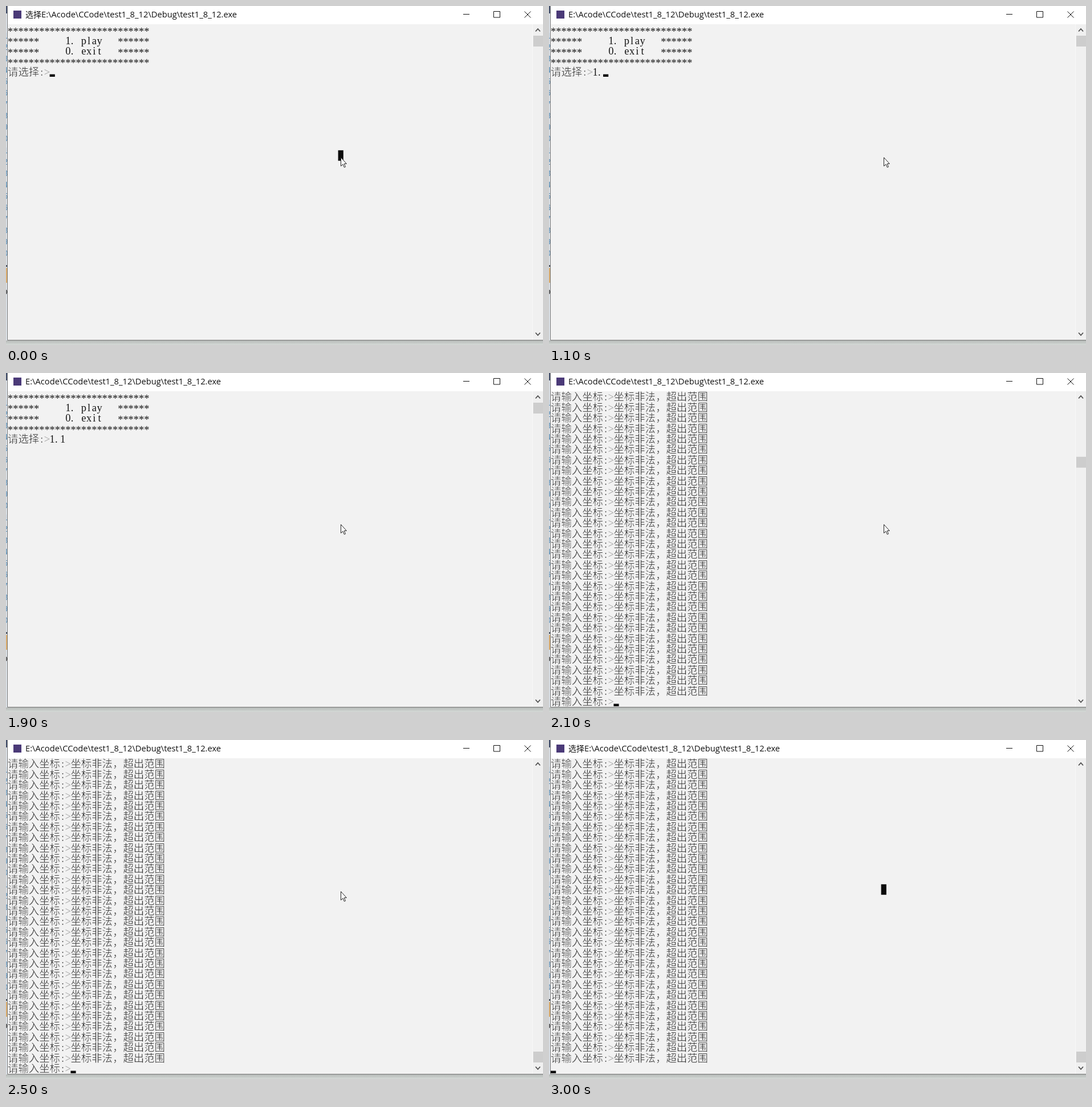
These frames come from a looping animation (942x594 px, 3100 ms). An HTML page:

```html
<!DOCTYPE html>
<html lang="zh">
<head>
<meta charset="utf-8">
<title>Console</title>
<style>
  html, body { margin: 0; width: 100%; height: 100%; overflow: hidden; background: #f2f2f2; }
  svg { display: block; width: 100vw; height: 100vh; }
  .cell { font: 18.4px "Liberation Serif", "Noto Sans CJK SC", "Noto Sans CJK", serif; text-anchor: middle; fill: #161616; }
  /* an outline in the paper colour makes the strokes finer */
  .fine { fill: #262626; stroke: #f2f2f2; stroke-width: 0.5; }
  .title { font: 14.7px "Open Sans", sans-serif; fill: #111; }
  .mark { font: 14px "Noto Sans CJK SC", "Noto Sans CJK", sans-serif; fill: #111; }
  .gutter { font: 15px "Liberation Mono", monospace; text-anchor: end; fill: #5f93bb; }
  .line { fill: none; stroke: #111; }
</style>
</head>
<body>
<svg id="stage" viewBox="0 0 942 594" preserveAspectRatio="none">
  <defs>
    <linearGradient id="shade" x1="0" y1="0" x2="0" y2="1">
      <stop offset="0" stop-color="#b4b8b6"/>
      <stop offset="1" stop-color="#d5dad7"/>
    </linearGradient>
    <clipPath id="edge"><rect width="2" height="594"/></clipPath>
  </defs>

  <!-- strip of the window behind -->
  <g clip-path="url(#edge)">
    <rect width="2" height="594" fill="#dfe4ea"/>
    <rect width="2" height="13" fill="#46536f"/>
    <g id="gutter"></g>
    <rect y="454" width="2" height="3" fill="#4a5361"/>
    <rect y="459" width="2" height="26" fill="#dfb070"/>
    <text class="gutter" x="3" y="505" style="fill:#333">b</text>
  </g>
  <rect y="586" width="942" height="8" fill="url(#shade)"/>

  <!-- console window -->
  <rect x="2" width="940" height="586" fill="#f2f2f2"/>
  <rect x="2" width="940" height="32" fill="#fff"/>
  <path class="line" d="M2.5 0V585.5H942" style="stroke:#777"/>
  <rect x="13" y="8" width="14" height="14" fill="#4b3a78"/>
  <text id="mark" class="mark" x="34" y="20.3">选择</text>
  <text id="title" class="title" y="20.3">E:\Acode\CCode\test1_8_12\Debug\test1_8_12.exe</text>
  <path class="line" d="M802 14.5H813M855.5 9.5H866.5V20H855.5ZM909.5 9.5L920.5 20.5M920.5 9.5L909.5 20.5"/>

  <!-- scroll bar -->
  <rect x="923" y="32" width="19" height="553" fill="#f0f0f0"/>
  <path class="line" d="M923.5 32V585" style="stroke:#f9f9f9"/>
  <path class="line" d="M929 44.5L933 40L937 44.5M929 572.5L933 577L937 572.5" style="stroke:#505050;stroke-width:1.8"/>
  <rect id="thumb" x="925" width="17" height="19" fill="#cdcdcd"/>

  <g id="menu"></g>
  <g id="flood"></g>
  <g id="prompt"></g>
  <rect id="caret" width="9.2" height="4.4" fill="#0c0c0c"/>
  <rect id="block" x="582.6" y="252.8" width="9.2" height="18.4" fill="#0c0c0c"/>
  <path id="mouse" d="M587.5 265.5v15l3.5-3.2 2.4 5.5 2.1-1-2.4-5.4h4.2z" fill="#fff" stroke="#222"/>
</svg>
<script>
  const LOOP = 3100, STEP = 100;
  const LEFT = 3, TOP = 32, CELL = 9.2, ROW = 18.4, LAST = 29;
  const $ = id => document.getElementById(id);
  const isWide = ch => ch > "\u2000";

  function addText(parent, cls, text, x, y) {
    const el = document.createElementNS("http://www.w3.org/2000/svg", "text");
    el.setAttribute("class", cls);
    el.setAttribute("x", x);
    el.setAttribute("y", y);
    el.textContent = text;
    parent.append(el);
    return el;
  }

  // Sets each character in its console cell; wide characters take two cells.
  function print(parent, row, text, col = 0) {
    const base = TOP + row * ROW + 16.3;
    const xs = [], ys = [];
    for (const ch of text) {
      const span = isWide(ch) ? 2 : 1;
      if (ch !== " ") {
        xs.push((LEFT + (col + span / 2) * CELL - (ch === "." ? 2 : 0)).toFixed(1));
        ys.push((base + (ch === "*" ? 2.4 : 0)).toFixed(1));
      }
      col += span;
    }
    const cls = [...text].some(isWide) ? "cell fine" : "cell";
    return addText(parent, cls, text.replace(/ /g, ""), xs.join(" "), ys.join(" "));
  }

  for (let k = -5; k <= 14; k++) {
    addText($("gutter"), "gutter", (k + 16) % 10, 3.5, 157 + k * 20.1);
  }

  const stars = "*".repeat(27), side = "*".repeat(6);
  [stars, `${side}     1. play   ${side}`, `${side}     0. exit   ${side}`, stars, "请选择:>"]
    .forEach((text, row) => print($("menu"), row, text));
  const keys = [[600, "1"], [1100, "."], [1200, "1"]].map(([at, ch], i) =>
    ({ at, el: print($("menu"), 4, ch, 8 + i) }));

  const ask = "请输入坐标:>";
  for (let row = 0; row < LAST; row++) print($("flood"), row, ask + "坐标非法，超出范围");
  print($("prompt"), LAST, ask);

  const show = (el, on) => el.setAttribute("visibility", on ? "inherit" : "hidden");

  function draw(time) {
    const t = Math.floor(time / STEP) * STEP;
    const flooding = t >= 2100, stopped = t >= 2600;
    const selecting = t < 600 || t >= 2700;

    show($("mark"), selecting);
    $("title").setAttribute("x", selecting ? 62 : 34);
    show($("block"), selecting);
    show($("mouse"), t < 2900);

    show($("menu"), !flooding);
    show($("flood"), flooding);
    show($("prompt"), flooding && !stopped);
    keys.forEach(key => show(key.el, !flooding && t >= key.at));

    const scroll = Math.min(1, Math.max(0, (t - 2000) / 500));
    $("thumb").setAttribute("y", flooding ? 47 + 499 * scroll : 52);

    const typed = keys.filter(key => t >= key.at).length;
    const col = stopped ? 0 : flooding ? 12 : 8 + typed;
    const row = flooding ? LAST : 4;
    const blinkOff = (t >= 1300 && t < 1600) || (t >= 1900 && t < 2100);
    $("caret").setAttribute("x", LEFT + col * CELL);
    $("caret").setAttribute("y", TOP + (row + 1) * ROW - 4.4);
    show($("caret"), !blinkOff);
  }

  function tick() {
    draw(performance.now() % LOOP);
    requestAnimationFrame(tick);
  }
  tick();
</script>
</body>
</html>
```
